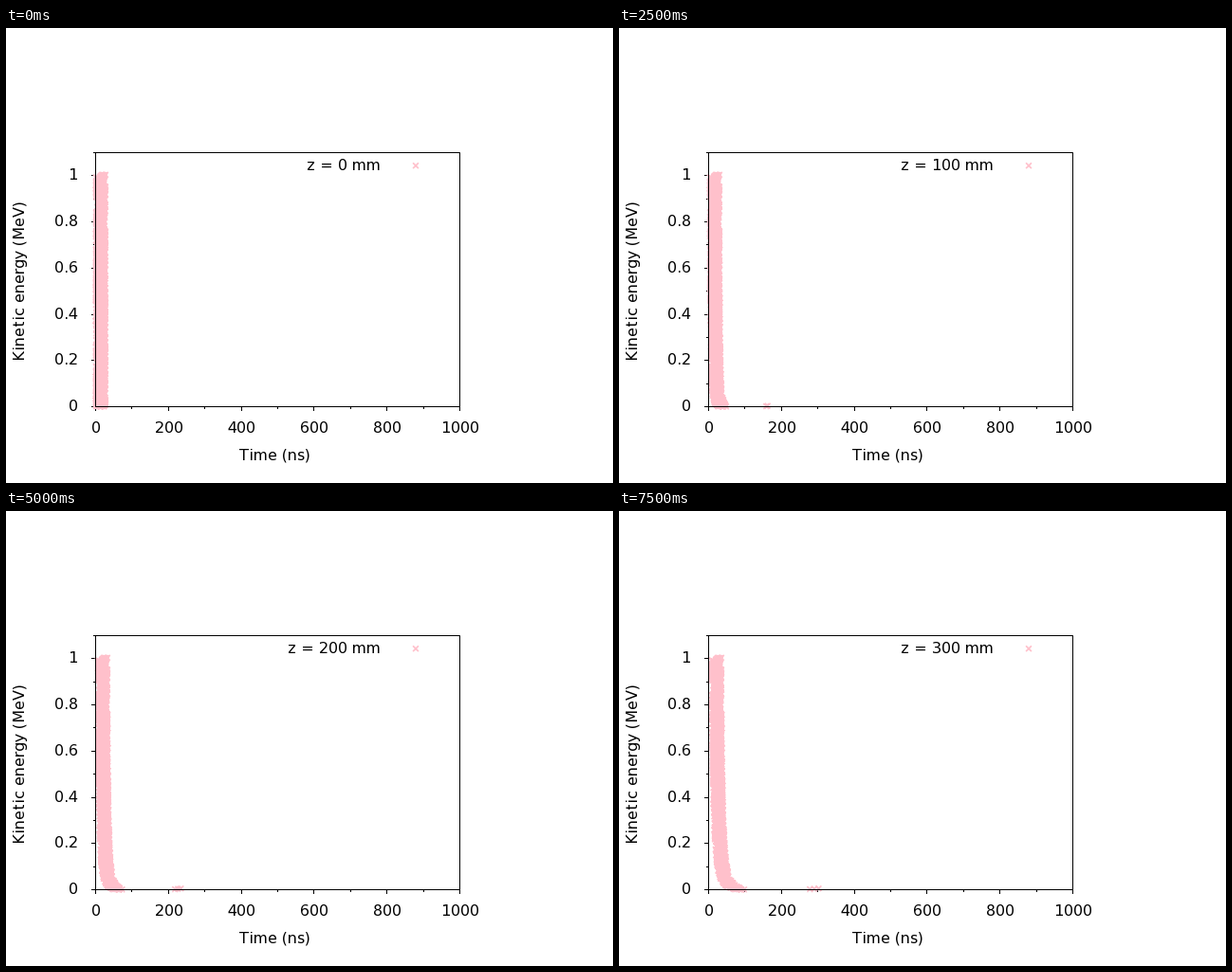
Write a matplotlib script that moves like this. It is 640x480 px and loops after 8 s.

```python
import numpy as np
import matplotlib.pyplot as plt
from matplotlib.animation import FuncAnimation

W, H, DPI = 640, 480, 100
PX = 72 / DPI                      # one pixel in points
LEFT, RIGHT, TOP, BOTTOM = 94.5, 478.5, 131.5, 399.5
PINK = "#ffc0cb"
FRAMES, STEP = 16, 20              # z grows by 20 mm per frame

plt.rcParams.update({
    "font.family": "DejaVu Sans",
    "font.size": 16 * PX,
    "path.simplify": False,
    "text.hinting": "force_autohint",
    "text.hinting_factor": 1,
})

fig = plt.figure(figsize=(W / DPI, H / DPI), dpi=DPI, facecolor="white")
ax = fig.add_axes([0, 0, 1, 1])
ax.set(xlim=(0, W), ylim=(H, 0))
ax.axis("off")


def px(t):
    return LEFT + (RIGHT - LEFT) * t / 1000


def py(e):
    return BOTTOM - (BOTTOM - TOP) * e / 1.1


def mid(v):
    """Centre of the pixel that holds v."""
    return np.floor(v) + 0.5


def line(xs, ys, z):
    ax.plot(xs, ys, color="black", lw=PX, zorder=z, snap=False,
            solid_capstyle="projecting", solid_joinstyle="miter")


def label(x, y, s, ha="center", **kw):
    return ax.text(x, y, s, ha=ha, va="baseline", color="black", zorder=4, **kw)


def crosses(x, y, r=2.9):
    """Polyline data for x-shaped markers, split by NaN."""
    x, y = np.atleast_1d(x)[:, None], np.atleast_1d(y)[:, None]
    dx = np.array([-r, r, np.nan, -r, r, np.nan])
    dy = np.array([-r, r, np.nan, r, -r, np.nan])
    return (x + dx).ravel(), (y + dy).ravel()


# Axes: ticks lie under the points, the border above them
for i in range(12):
    size = 2 if i % 2 else 4
    y = mid(py(i / 10))
    line([LEFT - size, LEFT], [y, y], 1)
    if i % 2 == 0:
        label(76.4, y + 4.5, f"{i / 10:g}", ha="right")
    if i <= 10:
        x = mid(px(100 * i))
        line([x, x], [BOTTOM, BOTTOM + size], 1)
        if i % 2 == 0:
            label(x + 0.3, 427, str(100 * i))
line([LEFT, RIGHT, RIGHT, LEFT, LEFT], [TOP, TOP, BOTTOM, BOTTOM, TOP], 3)

label(283.7, 455, "Time (ns)")
label(20, 266.3, "Kinetic energy (MeV)", rotation=90, rotation_mode="anchor")
title = label(394.7, 150, "", ha="right")

mark = dict(color=PINK, lw=1.7 * PX, solid_capstyle="butt", zorder=2, snap=False)
ax.plot(*crosses(432, 145.2), **mark)
cloud, = ax.plot([], [], **mark)

# Beam: spread start times, energies slightly denser near zero
rng = np.random.default_rng(7)
N = 1500
start = 27.3 * rng.beta(1.25, 1.15, N)
energy = 1.005 * rng.random(N) ** 1.15


def points(z):
    t = start + 0.026 * z / np.sqrt(energy + 0.01)
    # a new straggler joins every 60 mm, each a bit slower than the last
    k = np.arange(3)
    k = k[z >= 20 + 60 * k]
    slow = 98 + (0.6 + 0.04 * k) * z
    return np.append(t, slow), np.append(energy, 0.002 + 0.0015 * k)


def update(i):
    z = STEP * i
    t, e = points(z)
    cloud.set_data(*crosses(px(t), py(e)))
    title.set_text(f"z = {z} mm")
    return cloud, title


anim = FuncAnimation(fig, update, frames=FRAMES, interval=500,
                     repeat=True, repeat_delay=0)
plt.show()
```
